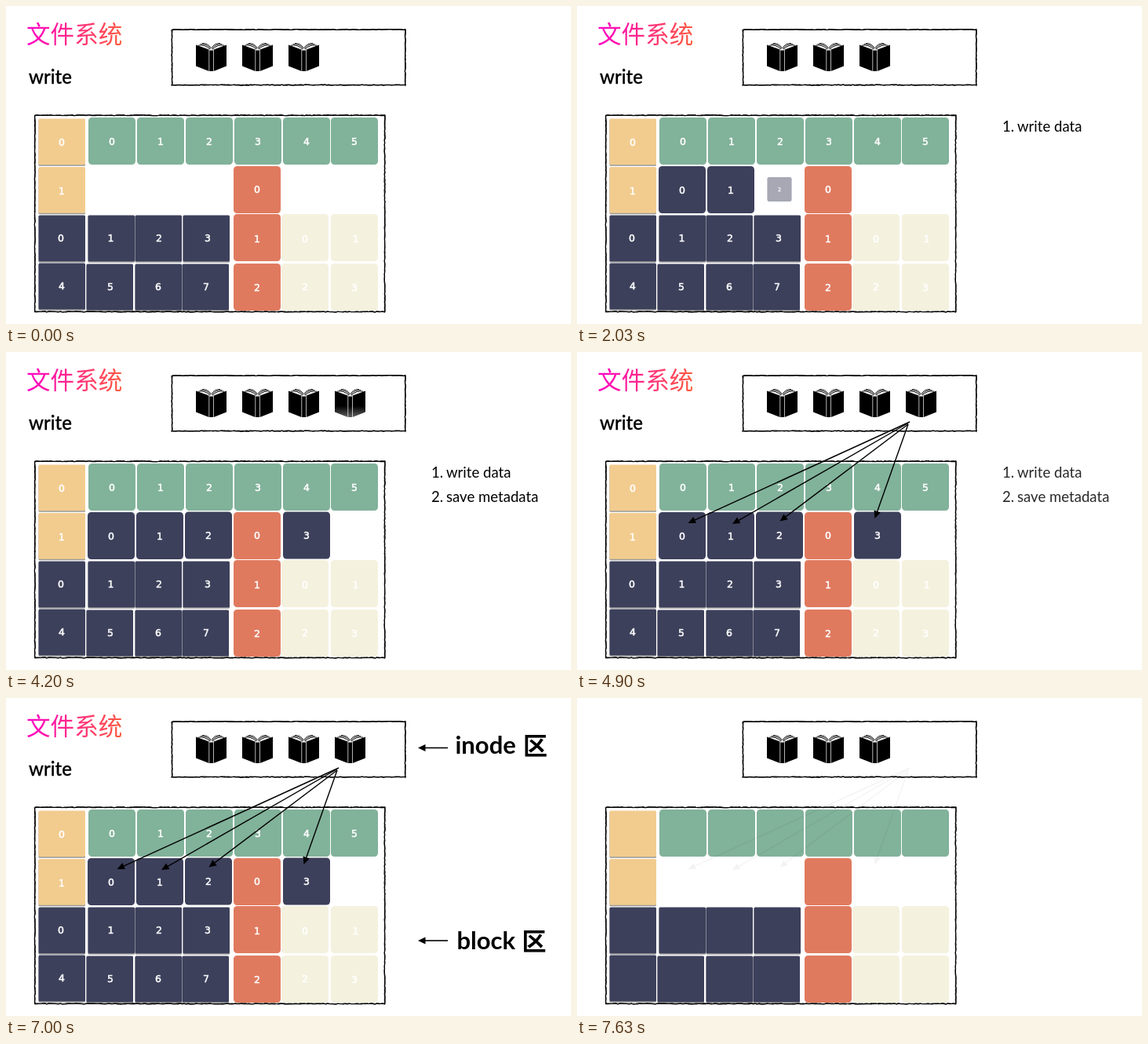
An HTML page that plays this animation: 720x405 px, repeating every 9170 ms.

```html
<!DOCTYPE html>
<html lang="zh">
<head>
<meta charset="utf-8">
<title>File system write</title>
<style>
  html, body { margin: 0; width: 100%; height: 100%; overflow: hidden; background: #fff; }
  svg { display: block; width: 720px; height: 405px; }
  text { font-family: Lato, "Noto Sans CJK SC", "Noto Sans CJK", sans-serif; }
  .cjk { font-family: "Noto Sans CJK SC", "Noto Sans CJK", sans-serif; }
  .digit { font: 12.5px "DejaVu Sans", sans-serif; fill: #fff; stroke: #fff; stroke-width: .5; text-anchor: middle; }
  .list { font-size: 18.6px; }
  .label { font-size: 31px; font-weight: 700; }
</style>
</head>
<body>
<svg viewBox="0 0 720 405" xmlns="http://www.w3.org/2000/svg">
  <defs>
    <linearGradient id="pink" gradientUnits="userSpaceOnUse" x1="27" y1="25" x2="148" y2="45">
      <stop offset="0" stop-color="#ff00c8"/>
      <stop offset="1" stop-color="#ff5a3c"/>
    </linearGradient>
    <g id="book">
      <path d="M0 2.5 L16.5 8.5 V36 L0 29.5Z M17.2 9.5 H22 V36 H17.2Z M22.7 8.5 L39 2.5 V29.5 L22.7 36Z"/>
      <path d="M3 3.2 Q11 1.5 18 8.2 M5.5 1.8 Q13 .6 18.8 7.4 M8 .6 Q15 0 19.3 6.6
               M36 3.2 Q28 1.5 21 8.2 M33.5 1.8 Q26 .6 20.4 7.4 M31 .6 Q24 0 19.7 6.6"
            fill="none" stroke="#000" stroke-width=".9"/>
    </g>
  </defs>
  <g id="base"></g>
  <g id="words"></g>
  <g id="added"></g>
  <g id="lines"></g>
</svg>
<script>
const LOOP = 9170, STEP = 70;
const YELLOW = '#f2cc8f', GREEN = '#81b29a', RED = '#e07a5f', NAVY = '#3d405b', CREAM = '#f4f1de';
const $ = id => document.getElementById(id);
const base = $('base'), words = $('words'), added = $('added'), lines = $('lines');
const defs = document.querySelector('defs');

function el(parent, tag, attrs, text) {
  const node = document.createElementNS('http://www.w3.org/2000/svg', tag);
  for (const key in attrs) node.setAttribute(key, attrs[key]);
  if (text !== undefined) node.textContent = text;
  parent.appendChild(node);
  return node;
}

const clamp = x => Math.min(1, Math.max(0, x));
const smooth = x => x * x * (3 - 2 * x);
const progress = (t, start, length) => smooth(clamp((t - start) / length));

let seed = 7;
function jitter(amount) {
  seed = (seed * 16807) % 2147483647;
  return (seed / 2147483647 - .5) * amount;
}

// Pencil-like frame: several passes of slightly shaky edges
function sketchFrame(x, y, w, h) {
  const corners = [[x, y], [x + w, y], [x + w, y + h], [x, y + h], [x, y]];
  for (let pass = 0; pass < 2; pass++) {
    let d = '';
    for (let i = 0; i < 4; i++) {
      const [ax, ay] = corners[i], [bx, by] = corners[i + 1];
      const n = Math.round(Math.hypot(bx - ax, by - ay) / 2.5);
      for (let k = 0; k <= n; k++) {
        const px = ax + (bx - ax) * k / n + jitter(1), py = ay + (by - ay) * k / n + jitter(1);
        d += (d ? 'L' : 'M') + px.toFixed(1) + ' ' + py.toFixed(1);
      }
    }
    el(base, 'path', { d, fill: 'none', stroke: '#000', 'stroke-width': 1.2 });
  }
}

function digit(parent, x, y, n) {
  el(parent, 'text', { x, y: y + 4.6, class: 'digit' }, n);
}

function tile(x, y, color, n, cx, cy) {
  const flat = color === YELLOW || color === NAVY;
  const size = flat ? 59.5 : 60, rx = flat ? 1.5 : 4.5;
  if (flat) el(base, 'rect', { x, y: y + .8, width: size, height: size, rx, fill: '#000', opacity: .4 });
  el(base, 'rect', { x, y, width: size, height: flat ? 58.8 : size, rx, fill: color });
  digit(words, cx, cy, n);
}

function label(parent, y, word, x, cjkX) {
  const g = el(parent, 'g', {});
  el(g, 'text', { x, y, class: 'label' }, word);
  el(g, 'text', { x: cjkX, y: y + .5, class: 'cjk', 'font-size': 31, 'font-weight': 700 }, '区');
  return g;
}

// Soft-edged reveal along x or y
let wipes = 0;
function wipe(node, from, to, soft, vertical) {
  const id = 'wipe' + wipes++;
  const axis = vertical ? { x1: 0, x2: 0, y1: 0, y2: soft } : { x1: 0, x2: soft, y1: 0, y2: 0 };
  const grad = el(defs, 'linearGradient', { id, gradientUnits: 'userSpaceOnUse', ...axis });
  el(grad, 'stop', { offset: 0, 'stop-color': '#fff' });
  el(grad, 'stop', { offset: 1, 'stop-color': '#000' });
  const full = { x: 0, y: 0, width: 720, height: 405 };
  const mask = el(defs, 'mask', { id: id + 'm', maskUnits: 'userSpaceOnUse', ...full });
  el(mask, 'rect', { ...full, fill: `url(#${id})` });
  node.setAttribute('mask', `url(#${id}m)`);
  return p => {
    const at = from - soft + (to - from + soft) * p;
    grad.setAttribute('gradientTransform', vertical ? `translate(0 ${at})` : `translate(${at} 0)`);
    node.setAttribute('visibility', p > 0 ? 'visible' : 'hidden');
  };
}

// Pop-in: scale and opacity per step
const POP_SCALE = [0, .27, .52, .8, .97, 1.033, 1];
const POP_ALPHA = [0, .22, .45, .64, .8, .91, 1];
function lookup(table, i) {
  const x = Math.min(table.length - 1, Math.max(0, i)), k = Math.floor(x);
  return k === table.length - 1 ? table[k] : table[k] + (table[k + 1] - table[k]) * (x - k);
}
function pop(node, cx, cy, start) {
  return t => {
    const i = (t - start) / STEP, s = lookup(POP_SCALE, i);
    node.setAttribute('transform', `translate(${cx} ${cy}) scale(${s}) translate(${-cx} ${-cy})`);
    node.setAttribute('opacity', lookup(POP_ALPHA, i));
  };
}

// Arrow that grows with its head at the tip
function arrow(parent, x1, y1, x2, y2, start, width) {
  const g = el(parent, 'g', {});
  const shaft = el(g, 'line', { x1, y1, stroke: '#000', 'stroke-width': width });
  const head = el(g, 'path', { d: 'M0 0 L-9.5 -4.4 V4.4Z' });
  const angle = Math.atan2(y2 - y1, x2 - x1), full = Math.hypot(x2 - x1, y2 - y1);
  return t => {
    const p = progress(t, start, 560), len = full * p, inner = Math.max(0, len - 8);
    const c = Math.cos(angle), s = Math.sin(angle);
    g.setAttribute('visibility', p > 0 ? 'visible' : 'hidden');
    shaft.setAttribute('x2', x1 + c * inner);
    shaft.setAttribute('y2', y1 + s * inner);
    head.setAttribute('transform',
      `translate(${x1 + c * len} ${y1 + s * len}) rotate(${angle * 180 / Math.PI}) scale(${Math.min(1, len / 9.5)})`);
  };
}

// Storage grid
[[143.5, 173], [205, 235]].forEach(([y, cy], i) => tile(41.5, y, YELLOW, i, 71, cy));
[105, 167, 229, 291, 353, 414].forEach((x, i) => tile(x, 142, GREEN, i, x + 30, 172));
[[204, 233], [265, 296], [328, 358]].forEach(([y, cy], i) => tile(290, y, RED, i, 320, cy));
[41.5, 104.5, 164.5, 225.5].forEach((x, i) => tile(x, 266.5, NAVY, i, [70, 133.5, 195, 257][i], 295.5));
[41.5, 102.5, 164.5, 224.5].forEach((x, i) => tile(x, i ? 328.5 : 327.5, NAVY, i + 4, [71, 133, 194, 255][i], i ? 357 : 356));
[[351, 265, 381, 296], [414, 265, 445.5, 296], [351, 328, 381, 357], [414, 328, 444, 358]]
  .forEach(([x, y, cx, cy], i) => tile(x, y, CREAM, i, cx, cy));
sketchFrame(36.8, 139.2, 445.8, 250.2);
sketchFrame(211.5, 30, 297.3, 70.6);
[242, 301, 360].forEach(x => el(base, 'use', { href: '#book', x, y: 47 }));

// Headings
el(words, 'text', { x: 26, y: 46.5, class: 'cjk', 'font-size': 30.6, fill: 'url(#pink)' }, '文件系统');
el(words, 'text', { x: 29, y: 98.5, 'font-size': 24, 'font-weight': 500, stroke: '#000', 'stroke-width': .3 }, 'write');

// Numbered list
const list = el(added, 'g', {});
const item = (n, text, y) => {
  const g = el(list, 'g', {});
  el(g, 'text', { x: 542, y, class: 'list' }, n + '.');
  el(g, 'text', { x: 561, y, class: 'list' }, text);
  return g;
};
const wipeFirst = wipe(item(1, 'write data', 160), 542, 644, 24);
const wipeSecond = wipe(item(2, 'save metadata', 190.5), 542, 682, 24);

// New blocks, labels and the fourth book
const moves = [[104, 204, 840], [166, 204, 1365], [228, 203.5, 1890], [353, 203.5, 2380]].map(([x, y, start], i) => {
  const g = el(added, 'g', {});
  el(g, 'rect', { x, y, width: 60, height: 60, rx: 4.5, fill: NAVY });
  digit(g, x + 30, y + 30, i);
  return pop(g, x + 30, y + 30, start);
});
const lastBook = el(added, 'g', {});
el(lastBook, 'use', { href: '#book', x: 419, y: 47 });
const wipeBook = wipe(lastBook, 46, 84, 38, true);
moves.push(
  pop(label(added, 71, 'inode', 572.5, 659), 631, 60, 4900),
  pop(label(added, 320, 'block', 574.5, 657.5), 631, 309, 5950),
  arrow(lines, 424, 89, 141.5, 218, 4340, 1.4),
  arrow(lines, 422, 90.5, 198, 219, 4340, 1.4),
  arrow(lines, 422, 92, 258.5, 215.5, 4340, 1.4),
  arrow(lines, 422, 92, 379.5, 212, 4340, 1.4),
  arrow(added, 563, 63.5, 525, 63.5, 5390, 1.6),
  arrow(added, 563, 309, 525, 309, 6440, 1.6)
);

function draw(t) {
  wipeFirst(progress(t, 0, 840));
  wipeSecond(progress(t, 2800, 770));
  wipeBook(clamp((t - 3640) / 700));
  list.setAttribute('opacity', 1 - progress(t, 4830, 280));
  moves.forEach(move => move(t));
  const gone = 1 - progress(t, 7000, 630);
  words.setAttribute('opacity', gone);
  added.setAttribute('opacity', gone);
  lines.setAttribute('opacity', 1 - progress(Math.min(t, 7630), 7000, 720));
}

const begin = performance.now();
function tick() {
  const t = (performance.now() - begin) % LOOP;
  draw(Math.floor(t / STEP) * STEP);
  requestAnimationFrame(tick);
}
draw(0);
requestAnimationFrame(tick);
</script>
</body>
</html>
```
